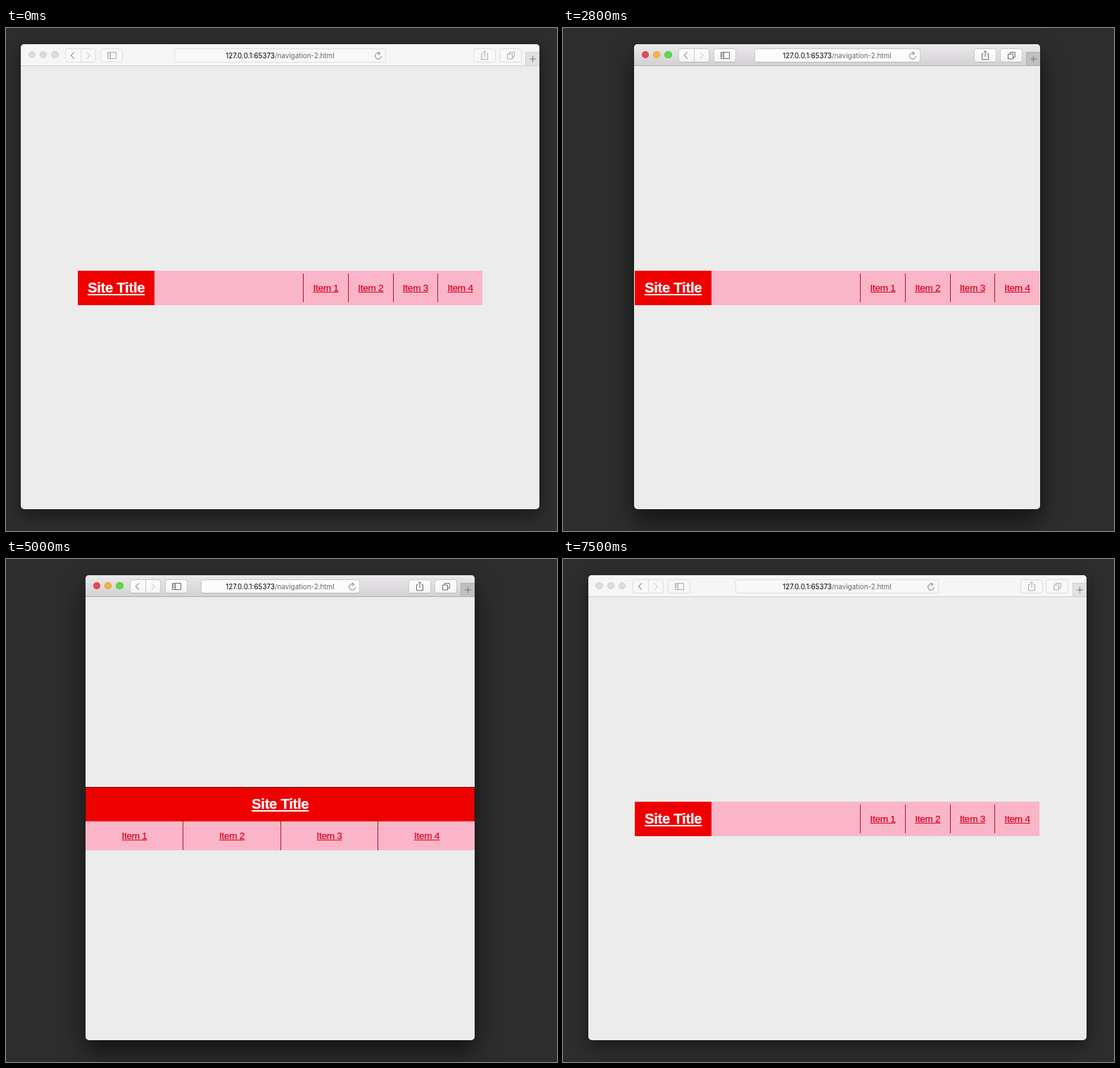
These frames come from a looping animation (783 px wide and 715 px high, 7600 ms). An HTML page:

```html
<!DOCTYPE html>
<html lang="en">
<head>
<meta charset="utf-8">
<title>Responsive navigation</title>
<style>
  * { box-sizing: border-box; }
  html, body { margin: 0; width: 100%; height: 100%; overflow: hidden; background: #2d2d2d; }
  svg { position: absolute; inset: 0; width: 100%; height: 100%; fill: none; stroke: var(--icon); overflow: visible; }

  #win {
    --icon: #a2a2a2; --edge: #dedede; --fill: #f8f8f8; --line: #d0d0d0; --tab: #e1e1e1;
    position: absolute; top: 23px; height: 661px; overflow: hidden;
    border-radius: 5px; background: #ececec;
    box-shadow: 0 0 1px rgba(0,0,0,.5), 0 9px 24px rgba(0,0,0,.45);
  }
  #win.active {
    --icon: #5c5c5c; --edge: #cac9ca; --fill: #fcfcfc; --line: #b0afb0; --tab: #c1bfc1;
    box-shadow: 0 0 1px rgba(0,0,0,.6), 0 16px 34px rgba(0,0,0,.6);
  }
  #bar { position: absolute; inset: 0 0 auto; height: 31px; background: #f6f6f6; border-bottom: 1px solid var(--line); }
  .active #bar { background: linear-gradient(#ebe9eb, #d3d1d3); }
  #bar > * { position: absolute; }

  .dot { top: 9.7px; width: 10.4px; height: 10.4px; border-radius: 50%; background: #dcdcdc; border: .5px solid #cfcfcf; }
  .active .dot { background: var(--c); border-color: rgba(0,0,0,.12); }
  .btn, #field { top: 5.5px; height: 20px; border: 1px solid var(--edge); border-radius: 4px; background: var(--fill); }
  .btn { width: 32px; }
  .active .btn, .active #field { border-bottom-color: #b9b8b9; }
  .active .btn { background: linear-gradient(#fff, #f4f4f4); }
  #arrows { left: 63px; width: 44px; }
  #side { left: 113px; }
  #tabs { right: 25.5px; }
  #more { right: 24px; top: 11px; width: 11px; height: 10px; --icon: #666; }
  #plus { right: 0; top: 11px; width: 20px; height: 19px; background: var(--tab); border: solid var(--line); border-width: 1px 0 0 1px; --icon: #777; }
  #reload { position: absolute; right: 4px; top: 3px; width: 12px; height: 13px; --icon: #777; }
  #url {
    position: absolute; inset: 0 23px 0 0; overflow: hidden; white-space: nowrap;
    font: 9.85px/19px Inter, Roboto, sans-serif; color: #666;
    -webkit-mask: linear-gradient(to left, transparent, #000 8px);
    mask: linear-gradient(to left, transparent, #000 8px);
  }
  #url span { position: absolute; top: 0; }
  #url b { font-weight: 400; color: #000; }

  nav {
    position: absolute; left: calc(50% - 287.3px); top: 321.5px; width: 574.6px; height: 49px;
    background: #fab6c8; font: 13.6px "Liberation Sans", Arial, sans-serif; text-align: center;
    letter-spacing: -.019em; -webkit-text-stroke: .25px;
  }
  nav a { text-decoration: underline; text-decoration-skip-ink: none; }
  #title {
    position: absolute; left: 0; top: 0; width: 108.5px; height: 49px; line-height: 49px;
    background: #ee0000; color: #fff; font-size: 20.4px; font-weight: 700; letter-spacing: -.017em;
  }
  #items { position: absolute; right: 0; top: 4px; display: flex; }
  #items div { width: 63.7px; height: 41px; line-height: 41px; border-left: 1px solid #b8102c; color: #de0021; }
  .narrow nav { left: 0; top: 301px; width: 100%; height: 90px; }
  .narrow #title { width: 100%; box-shadow: inset 0 1px #650a10, inset 1px 0 #b00508, inset -1px 0 #b00508; }
  .narrow #items { left: .6px; right: -.6px; top: 49px; }
  .narrow #items div { flex: 1; width: 0; }
  .narrow #items div:first-child { border-left: 0; }

  .tight .wide-only, #win:not(.tight) #more { display: none; }
</style>
</head>
<body>
<div id="win">
  <div id="bar">
    <i class="dot" style="left:10.5px;--c:#ea4856"></i>
    <i class="dot" style="left:26.9px;--c:#f5b63f"></i>
    <i class="dot" style="left:43.3px;--c:#5fda45"></i>
    <div class="btn" id="arrows"><svg>
      <path d="M21.5 0V18" stroke="var(--edge)"/>
      <path d="M12 4.3L7.3 9L12 13.7" stroke="#5c5c5c"/>
      <path d="M29.7 4.3L34.4 9L29.7 13.7" stroke="#bbb"/>
    </svg></div>
    <div class="btn wide-only" id="side"><svg>
      <path d="M9.5 4.5h12v9h-12zM13.5 4.5v9M10.5 6.5h2M10.5 8.5h2M10.5 10.5h2" stroke-width=".9"/>
    </svg></div>
    <div id="field">
      <div id="url"><span><b>127.0.0.1:65373</b>/navigation-2.html</span></div>
      <div id="reload"><svg>
        <path d="M8.6 3.2A4.4 4.4 0 1 0 10.4 7M5.8 .6L8.8 3.3L5.6 5.2"/>
      </svg></div>
    </div>
    <div class="btn" id="share"><svg>
      <path d="M12.5 6.5h-2v8.3h9V6.5h-2M15 11V2.5M12.7 4.8L15 2.5L17.3 4.8" stroke-width=".9"/>
    </svg></div>
    <div class="btn wide-only" id="tabs"><svg>
      <path d="M10.5 7h7v7h-7zM13.3 7V4.5h7v7h-2.8" stroke-width=".9"/>
    </svg></div>
    <div id="more"><svg><path d="M1 1L5 5L1 9M6 1L10 5L6 9" stroke-width="1.1"/></svg></div>
    <div id="plus"><svg><path d="M9.5 4.5v9M5 9h9"/></svg></div>
  </div>
  <nav>
    <div id="title"><a>Site Title</a></div>
    <div id="items">
      <div><a>Item 1</a></div><div><a>Item 2</a></div><div><a>Item 3</a></div><div><a>Item 4</a></div>
    </div>
  </nav>
</div>
<script>
  const LOOP = 7600, STEP = 100, CENTER = 389.7;
  // Time in ms and half the window width at that time
  const path = [
    [1900, 368.5], [2100, 361], [2400, 337.3], [2700, 293], [3200, 271], [3500, 245], [3900, 206.5],
    [4600, 206.5], [5000, 276.5], [5200, 302], [5400, 323], [5700, 346], [5900, 354]
  ];
  const $ = id => document.getElementById(id);
  const win = $('win'), field = $('field'), share = $('share');
  const url = document.querySelector('#url span');
  const px = v => v.toFixed(2) + 'px';

  function halfWidth(t) {
    if (t <= path[0][0]) return path[0][1];
    for (let i = 1; i < path.length; i++) {
      const [t0, a] = path[i - 1], [t1, b] = path[i];
      if (t <= t1) return a + (b - a) * (t - t0) / (t1 - t0);
    }
    return path[path.length - 1][1];
  }

  function render(t) {
    const half = halfWidth(t), width = half * 2, tight = width < 441;
    win.style.left = px(CENTER - half);
    win.style.width = px(width);
    win.classList.toggle('active', t >= 1000 && t < 7000);
    win.classList.toggle('narrow', width < 574);
    win.classList.toggle('tight', tight);

    const fieldWidth = Math.max(185, width * .409);
    const fieldLeft = tight ? 114 : Math.max(half - fieldWidth / 2, 154);
    field.style.left = px(fieldLeft);
    field.style.width = px(fieldWidth);
    url.style.left = px(Math.max(half - 78 - fieldLeft, 20) - .5);
    share.style.left = px(tight ? fieldLeft + fieldWidth + 13 : width - 94);
  }

  function tick() {
    render(Math.floor(performance.now() % LOOP / STEP) * STEP);
    requestAnimationFrame(tick);
  }
  tick();
</script>
</body>
</html>
```
